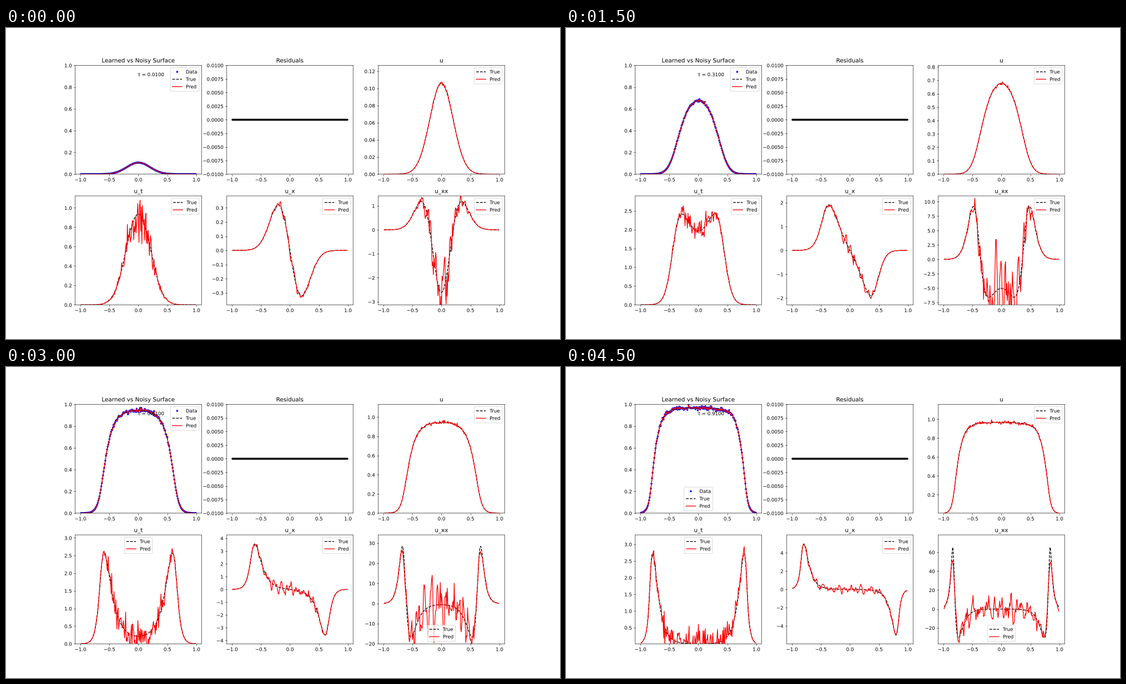
A matplotlib script for the animation above (5000 ms loop, 998 by 561 pixels).

```python
import numpy as np
import matplotlib.pyplot as plt
from matplotlib import patheffects
from matplotlib.animation import FuncAnimation

plt.rcParams.update({
    "font.family": "DejaVu Sans",
    "path.snap": False,
    "path.effects": [patheffects.Normal()],   # sub-pixel text and markers
    "axes.linewidth": 0.72,
    "xtick.major.width": 0.72,
    "ytick.major.width": 0.72,
})

FRAMES, INTERVAL = 10, 500
D, R, SCALE, NOISE = 0.02, 10.0, 0.967, 0.01   # diffusion, growth, height, noise
H = 0.01                                       # data spacing in x and t
DX, DT = H / 2, H / 40                         # solver steps
HALF, DEG = 5, 3                               # local fit half-width and degree

grid = np.linspace(-1.2, 1.2, 481)
inside = slice(42, 439, 2)                     # data points in [-0.99, 0.99]
xs = grid[inside]


def rate(v):
    """Growth with density-dependent diffusion."""
    flux = D * (v[1:] + v[:-1]) / 2 * np.diff(v) / DX
    return np.diff(flux, prepend=0, append=0) / DX + R * v * (1 - v)


def solve():
    """Profiles at t = H, 2H, ... 99H."""
    v = 0.1 * np.exp(-grid**2 / 0.08)
    profiles = []
    for _ in range(99):
        for _ in range(40):
            v = v + DT * rate(v + DT / 2 * rate(v))
        profiles.append(v)
    return np.array(profiles)


def fit_weights(c, n):
    """Window and weights for the first two derivatives at index c."""
    start = min(max(c - HALF, 0), n - 2 * HALF - 1)
    idx = np.arange(start, start + 2 * HALF + 1)
    inv = np.linalg.pinv(np.vander((idx - c).astype(float), DEG + 1, increasing=True))
    return idx, inv[1] / H, 2 * inv[2] / H**2


fine = solve()
clean = SCALE * fine[:, inside]
rng = np.random.RandomState(0)
noisy = clean * (1 + NOISE * rng.randn(*clean.shape))


def true_fields(row):
    v = fine[row]
    ux = np.gradient(v, DX)
    uxx = np.zeros_like(v)
    uxx[1:-1] = np.diff(v, 2) / DX**2
    return [SCALE * f[inside] for f in (v, rate(v), ux, uxx)]


def fitted_fields(row):
    y = noisy[row]
    idx, w, _ = fit_weights(row, len(noisy))
    ut = w @ noisy[idx]
    ux, uxx = np.zeros_like(y), np.zeros_like(y)
    for c in range(len(y)):
        idx, w1, w2 = fit_weights(c, len(y))
        ux[c], uxx[c] = w1 @ y[idx], w2 @ y[idx]
    return [y, ut, ux, uxx]


rows = [10 * k for k in range(FRAMES)]
TRUE = [true_fields(r) for r in rows]
PRED = [fitted_fields(r) for r in rows]

UR, UC, LL, LC = "upper right", "upper center", "lower left", "lower center"
LEGENDS = {
    "data": [UR] * 8 + [LC] * 2,
    "u": [UR] * 10,
    "u_t": [UR] * 6 + [UC] * 4,
    "u_x": [UR] * 10,
    "u_xx": [UR] * 4 + [LL] * 2 + [LC, UC, LC, LC],
}

fig, axes = plt.subplots(2, 3, figsize=(16, 8.994), dpi=62.375)
surface, resid, *fields = axes.flat


def curves(ax, true, pred):
    ax.plot(xs, true, "k--", label="True")
    ax.plot(xs, pred, "r", label="Pred")


def fit_ylim(ax, y):
    lo, hi = 1.2 * y.min(), 1.2 * y.max()
    ax.set_ylim(lo, hi)
    # keep ticks that miss the edge by a hair
    tol = 0.5 / 315 * (hi - lo)
    for tick in ax.get_yticks():
        if lo - tol < tick < lo + tol:
            lo = min(lo, tick)
        if hi - tol < tick < hi + tol:
            hi = max(hi, tick)
    ax.set_ylim(lo, hi)


def update(k):
    true, pred = TRUE[k], PRED[k]
    for ax in axes.flat:
        ax.clear()
        ax.set_xlim(-1.089, 1.089)

    surface.plot(xs, pred[0], "b.", label="Data")
    curves(surface, true[0], pred[0])
    surface.set_ylim(0, 1)
    surface.set_title("Learned vs Noisy Surface")
    surface.text(0, 0.9, f"t = {(rows[k] + 1) * H:.4f}")
    surface.legend(loc=LEGENDS["data"][k])

    resid.plot(xs, np.zeros_like(xs), "k.")
    resid.set_ylim(-0.01, 0.01)
    resid.set_title("Residuals")

    for ax, name, a, b in zip(fields, ("u", "u_t", "u_x", "u_xx"), true, pred):
        curves(ax, a, b)
        fit_ylim(ax, a)
        ax.set_title(name)
        ax.legend(loc=LEGENDS[name][k])
    return []


anim = FuncAnimation(fig, update, frames=FRAMES, init_func=lambda: update(0),
                     interval=INTERVAL, repeat=True)
plt.show()
```
